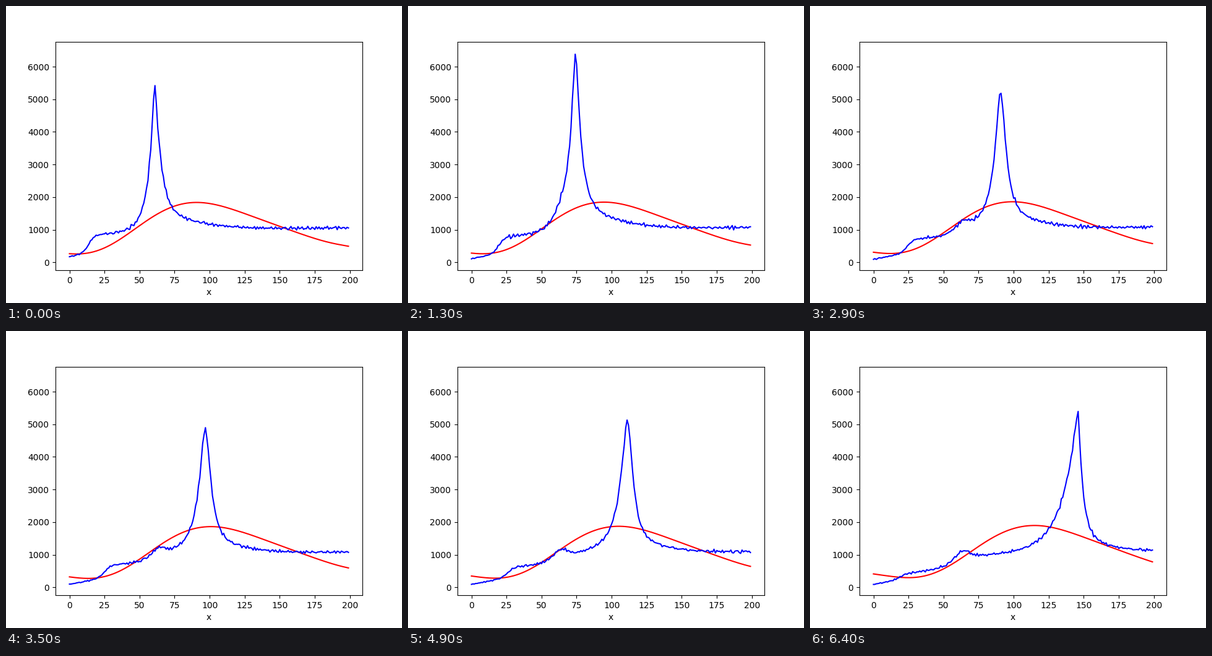
Write a matplotlib script that moves like this. It is 640x480 px and loops after 6.5 s.

```python
import numpy as np
import matplotlib.pyplot as plt
from matplotlib.animation import FuncAnimation

FRAMES, INTERVAL = 65, 100
TRAVEL = 85  # how far the spike moves in one loop, in x units
x = np.arange(200)

# A few points on the smooth hump at the start, joined by a polynomial.
hump_x = [-18, -8, 4, 20, 36, 50, 63, 76, 90, 110, 130, 150, 170, 185, 199]
hump_y = [366, 302, 260, 360, 705, 1125, 1490, 1745,
          1830, 1710, 1420, 1100, 805, 612, 495]
hump = np.polynomial.Polynomial.fit(hump_x, hump_y, 9)


def travel(n):
    """Steady motion that speeds up near the end of the loop."""
    return 1.03 * n + 0.236 * max(n - 55, 0) ** 2


def step(centre, width):
    return 0.5 * (1 + np.tanh((x - centre) / (2 * width)))


def mix(a, b, weight):
    return a + (b - a) * weight


def smooth_curve(s):
    """The hump drifts right, its crest a little faster than its dip."""
    u = x - (90 + 0.285 * s)
    u = np.where(u < 0, u * 86 / (86 + 0.05 * s), u)
    low, high = 260 + 0.47 * s, 1830 + 0.7 * s
    return low + (high - low) * (hump(90 + u) - 260) / 1570


def spike(s):
    """Sharp core on a wide skirt; the rear side stretches as it moves."""
    q = s / TRAVEL
    wobble = np.exp(-s / 55) * np.cos(2 * np.pi * (s - 14) / 56)
    height = 4430 + 1340 * wobble
    d = x - (60.8 + s)
    blunt = 0.4 + 2 * np.sin(np.pi * q) ** 2
    r = np.hypot(d, blunt) - blunt
    rear = 0.7 * np.exp(-r / (3.4 + 6 * q ** 4)) + 0.3 * np.exp(-r / (9 + 9 * q))
    front = 0.8 * np.exp(-r / (3.9 - 0.8 * q)) + 0.2 * np.exp(-r / (26 - 10 * q))
    return height * np.where(d < 0, rear, front)


def ground(s):
    """Foot, plateau and far level, blended by two soft steps, plus a bump."""
    q = s / TRAVEL
    foot = 90 + 80 * np.exp(-s / 10) + 8 * x
    plateau = 850 - 4.9 * s + 6 * q * (x - 25)
    far = 950 + (0.85 + 0.4 * q) * np.maximum(x - 70, 0)
    onset = 14 + 0.5 * s - 0.0052 * s ** 2
    y = mix(mix(foot, plateau, step(onset, 2.2)), far, step(56, 3.7))
    return y + 190 * np.exp(-((x - 64) / 6) ** 2)


def noisy_curve(s, n):
    y = ground(s) + spike(s)
    w = np.random.default_rng(40 + n).normal(size=x.size + 1)
    return y + 0.55 * np.diff(w) * np.sqrt(y)


fig, ax = plt.subplots(figsize=(6.4, 4.8), dpi=100)
ax.set_xlim(-9.95, 208.95)
ax.set_ylim(-244, 6767)
ax.set_xlabel("x")
red, = ax.plot([], [], "r")
blue, = ax.plot([], [], "b")


def draw(n):
    s = travel(n)
    red.set_data(x, smooth_curve(s))
    blue.set_data(x, noisy_curve(s, n))
    return red, blue


anim = FuncAnimation(fig, draw, frames=FRAMES, interval=INTERVAL, repeat=True)
plt.show()
```
